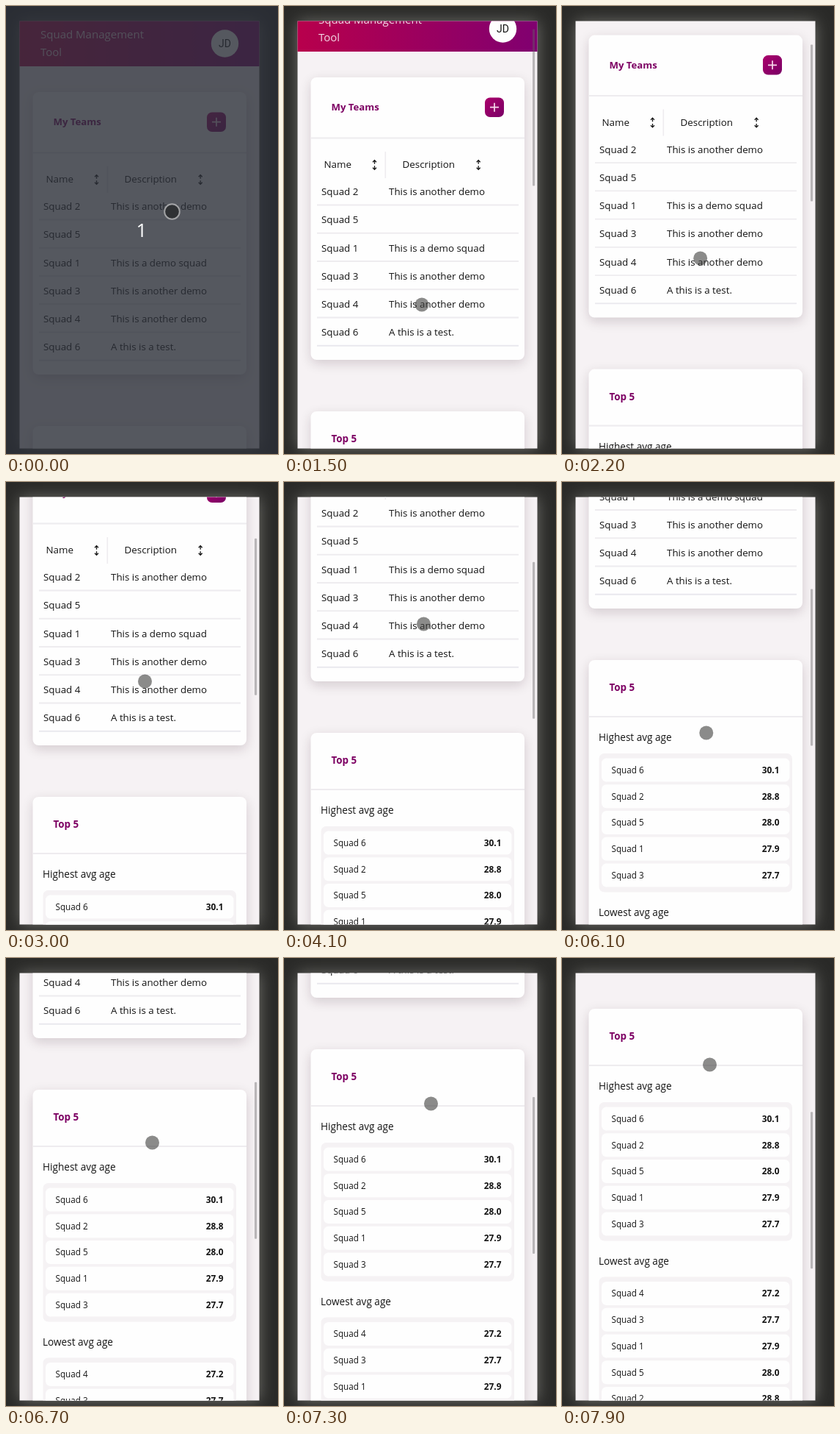
An HTML page with a canvas for the animation above (8000 ms loop, 371 by 609 pixels).

```html
<!DOCTYPE html>
<html lang="en">
<head>
<meta charset="utf-8">
<title>Team list scrolling</title>
<style>
html, body { margin: 0; width: 100%; height: 100%; overflow: hidden; background: #2a2a28; }
canvas { display: block; width: 371px; height: 609px; }
</style>
</head>
<body>
<canvas id="stage"></canvas>
<script>
const W = 371, H = 609, LOOP = 8000, STEP = 100;
const SANS = '"Open Sans", "Noto Sans", sans-serif';
const VIEW = { x: 18.5, y: 20.5, w: 327, h: 581 };
const INK = '#141414', PLUM = '#7d0063', RULE = '#eeecef', PAGE = '#f6f2f4', CARD = '#fefefe';

const canvas = document.getElementById('stage');
const ctx = canvas.getContext('2d');
const dpr = window.devicePixelRatio || 1;
canvas.width = W * dpr;
canvas.height = H * dpr;

// Keyframes: time, then values
const cursorKeys = [
  [100, 241, 379], [200, 241, 379], [600, 79, 273], [700, 79, 273],
  [1200, 198, 422], [1300, 198, 422], [1500, 188, 406], [3000, 189.5, 271],
  [4100, 190.5, 193], [4900, 193, 128], [5000, 193, 128], [5300, 194.5, 347],
  [5400, 194.5, 347], [5600, 195, 401], [5700, 195, 401], [6700, 199.5, 251],
  [7900, 201.5, 145]
];
const scrollKeys = [
  [1300, 0], [1500, 20], [3000, 143], [4100, 230], [4900, 287],
  [5700, 287], [6700, 392], [7900, 502]
];
const barKeys = [[1300, 0], [1400, 1], [5000, 1], [5300, 0.4], [5600, 0], [5700, 0], [5800, 1]];

const teams = [
  ['Squad 2', 'This is another demo'], ['Squad 5', ''], ['Squad 1', 'This is a demo squad'],
  ['Squad 3', 'This is another demo'], ['Squad 4', 'This is another demo'], ['Squad 6', 'A this is a test.']
];
const highest = [[6, '30.1'], [2, '28.8'], [5, '28.0'], [1, '27.9'], [3, '27.7']];
const lowest = [[4, '27.2'], [3, '27.7'], [1, '27.9'], [5, '28.0'], [2, '28.8']];

function sample(keys, t) {
  const next = keys.findIndex(k => k[0] > t);
  if (next === 0) return keys[0].slice(1);
  if (next < 0) return keys[keys.length - 1].slice(1);
  const a = keys[next - 1], b = keys[next];
  const p = (t - a[0]) / (b[0] - a[0]);
  return a.slice(1).map((v, i) => v + (b[i + 1] - v) * p);
}

function text(str, x, y, size, color = INK, weight = 400, align = 'left', family = SANS) {
  ctx.font = `${weight} ${size}px ${family}`;
  ctx.fillStyle = color;
  ctx.textAlign = align;
  ctx.fillText(str, x, y);
}

function box(x, y, w, h, r, fill) {
  ctx.beginPath();
  ctx.roundRect(x, y, w, h, r);
  ctx.fillStyle = fill;
  ctx.fill();
}

function disc(x, y, r, fill) {
  ctx.beginPath();
  ctx.arc(x, y, r, 0, Math.PI * 2);
  ctx.fillStyle = fill;
  ctx.fill();
}

function line(color, width, ...points) {
  ctx.beginPath();
  points.forEach(([x, y], i) => i ? ctx.lineTo(x, y) : ctx.moveTo(x, y));
  ctx.strokeStyle = color;
  ctx.lineWidth = width;
  ctx.stroke();
}

function shadow(color, blur, dy = 0) {
  ctx.shadowColor = color;
  ctx.shadowBlur = blur * dpr;
  ctx.shadowOffsetY = dy * dpr;
}

function gradient(x0, y0, x1, y1, from, to) {
  const g = ctx.createLinearGradient(x0, y0, x1, y1);
  g.addColorStop(0, from);
  g.addColorStop(1, to);
  return g;
}

function card(y, h) {
  ctx.save();
  shadow('rgba(40, 10, 30, 0.17)', 16, 5);
  box(36.5, y, 291.5, h, 8, CARD);
  ctx.restore();
}

function header() {
  ctx.fillStyle = gradient(18, 0, 346, 0, '#b8004c', '#800070');
  ctx.fillRect(18, 20, 328, 62);
  text('Squad Management', 47, 44, 15, '#f3d9e6');
  text('Tool', 47, 68, 15, '#f3d9e6');
  disc(298.5, 51, 18.7, '#fefefe');
  text('JD', 298.5, 56, 14, INK, 400, 'center', 'Roboto, sans-serif');
}

function sortIcon(x, y) {
  for (const s of [-1, 1]) {
    const tip = y + s * 6.3;
    line(INK, 1.3, [x, y + s * 1.3], [x, tip]);
    line(INK, 1.3, [x - 2.5, tip - s * 2.6], [x, tip], [x + 2.5, tip - s * 2.6]);
  }
}

function teamTable() {
  card(117, 384);
  text('My Teams', 64.5, 162, 13.2, PLUM, 700);
  box(274, 144.5, 26, 26.5, 7, gradient(274, 144, 300, 171, '#ab006b', '#790066'));
  line('#f7d9ec', 1.7, [281, 157.7], [293, 157.7]);
  line('#f7d9ec', 1.7, [287, 151.7], [287, 163.7]);
  line(RULE, 2, [36.5, 199.5], [328, 199.5]);
  line(RULE, 1.6, [138.3, 218], [138.3, 254]);
  text('Name', 54.5, 240, 13.4);
  text('Description', 161.5, 240, 13.4);
  sortIcon(123.5, 236);
  sortIcon(265.2, 236);
  teams.forEach(([name, about], i) => {
    const y = 277 + 38.25 * i;
    text(name, 51, y, 13.35);
    text(about, 143, y, 13.35);
    line(i < 5 ? RULE : '#e9e8ee', 1.8, [45, y + 13.5], [320, y + 13.5]);
  });
}

function ranking(title, rows, top) {
  text(title, 50, top - 17, 13.6);
  box(50.5, top, 263.5, 188.5, 7, '#f5f2f4');
  rows.forEach(([id, age], i) => {
    const y = top + 6.5 + 35.75 * i;
    box(54, y, 256.5, 32, 6.5, CARD);
    text('Squad ' + id, 67.5, y + 20.3, 11.7);
    text(age, 296.5, y + 20.3, 11.9, INK, 700, 'right');
  });
}

function topFive() {
  card(571, 900);
  text('Top 5', 64.5, 613, 13.4, PLUM, 700);
  line(RULE, 2, [36.5, 648], [328, 648]);
  ranking('Highest avg age', highest, 698);
  ranking('Lowest avg age', lowest, 935.5);
}

function backdrop() {
  ctx.fillStyle = '#2a2a28';
  ctx.fillRect(0, 0, W, H);
  ctx.save();
  shadow('rgba(135, 135, 130, 0.75)', 20);
  ctx.fillStyle = PAGE;
  ctx.fillRect(VIEW.x, VIEW.y, VIEW.w, VIEW.h);
  ctx.restore();
}

function countdown() {
  ctx.fillStyle = 'rgba(43, 47, 55, 0.8)';
  ctx.fillRect(0, 0, W, H);
  disc(226.5, 279.5, 10.3, '#2f3134');
  ctx.strokeStyle = '#a3a4a6';
  ctx.lineWidth = 1.9;
  ctx.stroke();
  text('1', 185, 314, 26, '#fff', 400, 'center');
}

function draw(t) {
  const [scroll] = sample(scrollKeys, t);
  const [barAlpha] = sample(barKeys, t);
  ctx.setTransform(dpr, 0, 0, dpr, 0, 0);
  backdrop();

  ctx.save();
  ctx.beginPath();
  ctx.rect(VIEW.x, VIEW.y, VIEW.w, VIEW.h);
  ctx.clip();
  ctx.save();
  ctx.translate(0, -scroll);
  header();
  teamTable();
  topFive();
  ctx.restore();
  box(339, 24 + 0.369 * scroll, 3.2, 213, 1, `rgba(100, 98, 100, ${0.42 * barAlpha})`);
  ctx.restore();

  if (t < STEP) {
    countdown();
  } else {
    const [x, y] = sample(cursorKeys, t);
    disc(x, y, 9.5, 'rgba(62, 62, 60, 0.6)');
  }
}

function tick(now) {
  const t = now % LOOP;
  draw(Math.floor(t / STEP) * STEP);
  requestAnimationFrame(tick);
}

draw(0);
requestAnimationFrame(tick);
</script>
</body>
</html>
```
